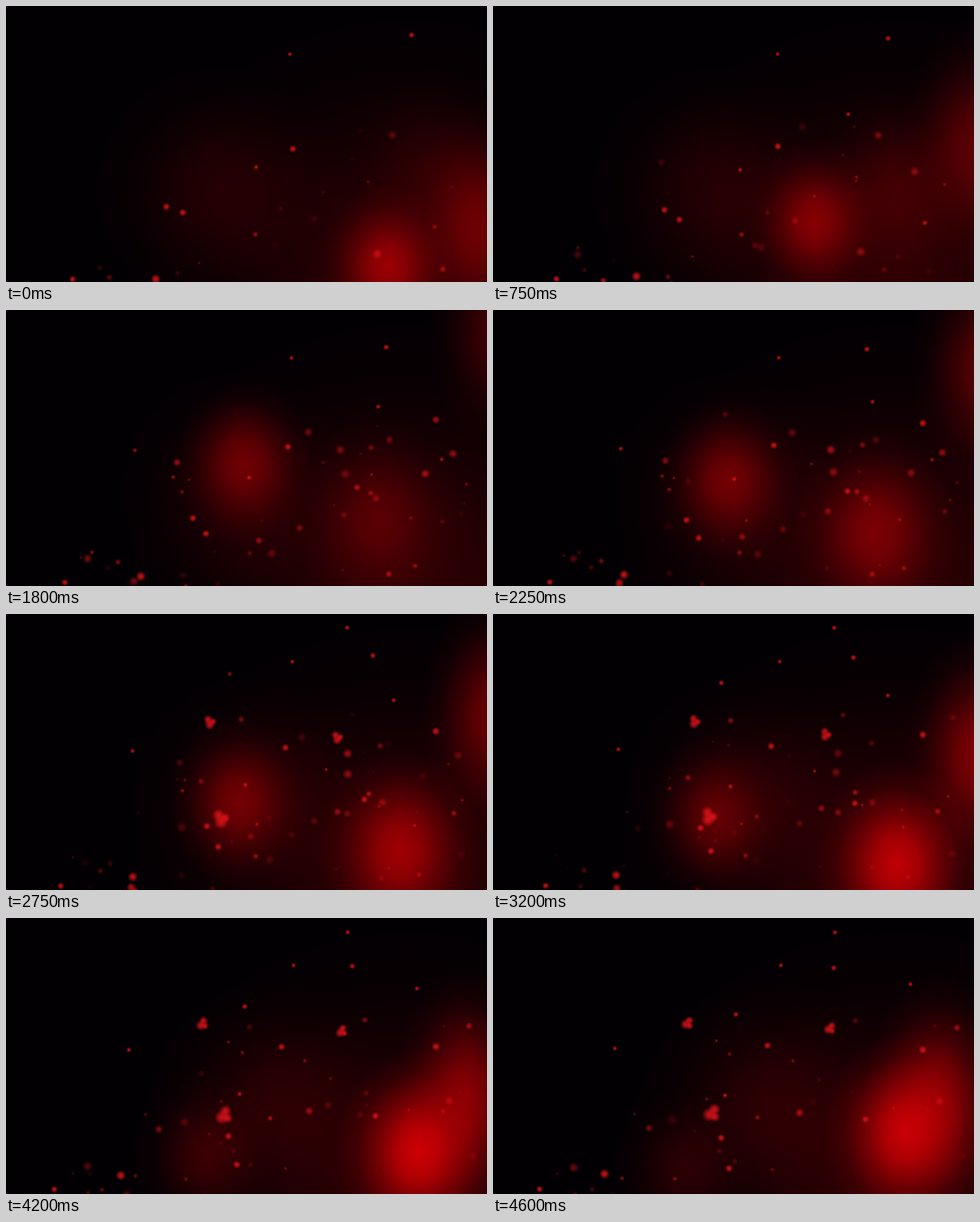
Recreate the animation shown at these times as an HTML page with a canvas. Size 498 by 286 pixels, loop 4650 ms.

```html
<!DOCTYPE html>
<html lang="en">
<head>
<meta charset="utf-8">
<title>Red embers</title>
<style>
  html, body { margin: 0; width: 100%; height: 100%; overflow: hidden; background: #030003; }
  canvas { display: block; }
</style>
</head>
<body>
<canvas id="stage" width="498" height="286"></canvas>
<script>
const ctx = document.getElementById('stage').getContext('2d');
const WIDTH = 498, HEIGHT = 286;
const LOOP = 4.65, STEP = 0.05;

// Smoke clouds drift between a few points: time, x, y, strength.
const clouds = [
  { r: 72, stretch: 1.2, path: [
    [0, 395, 270, .62], [1.8, 246, 158, .42], [2.75, 240, 195, .42], [LOOP, 195, 262, .15]] },
  { r: 86, stretch: 1.25, path: [
    [0, 440, 170, .1], [1.8, 385, 215, .28], [3.6, 428, 272, .98], [LOOP, 426, 220, .85]] },
  { r: 76, stretch: 1.7, path: [
    [0, 490, 230, .4], [1.8, 512, 20, .3], [3.6, 500, 180, .6], [LOOP, 460, 185, .5]] }
];

// Bright embers: x, y, end x, end y, radius, birth time.
const leaders = [
  [420, 30, 352, 52, 2.1, 0],
  [69, 283, 48, 281, 2.4, 0],
  [166, 208, 237, 228, 2.6, 0],
  [183, 214, 245, 260, 2.6, 0],
  [259, 167, 240, 184, 1.7, 0],
  [297, 148, 284, 132, 2.6, 0],
  [294, 50, 298, 49, 1.6, 0],
  [155, 283, 115, 265, 3.4, 0],
  [362, 116, 433, 68, 1.7, .4],
  [445, 112, 445, 137, 2.8, 1.6],
  [362, 182, 386, 209, 2.5, 1.6],
  [134, 146, 126, 135, 1.7, 1.6],
  [353, 14, 354, 15, 1.8, 2.5],
  [230, 59, 252, 101, 2, 2.6],
  [222, 213, 228, 202, 6, 2.4],
  [213, 112, 202, 109, 4.4, 2.4],
  [342, 130, 350, 114, 4.2, 2.4]
];

let seed = 23;
const random = () => (seed = seed * 16807 % 2147483647) / 2147483647;
const between = (a, b) => a + (b - a) * random();

// Small embers gather below a diagonal rising to the right.
const swarm = Array.from({ length: 85 }, () => {
  const x = between(70, 480);
  return {
    x, y: HEIGHT - Math.min(190, x - 50) * random(),
    vx: between(-9, 10), vy: between(-9, 6),
    r: 1.2 + 2.4 * random() ** 2,
    alpha: between(.2, .75),
    birth: between(-1.5, 3.6), life: between(2, 4)
  };
});

const mix = (a, b, k) => a + (b - a) * k;

function blob(x, y, r, stretch, color, stops) {
  const fill = ctx.createRadialGradient(0, 0, 0, 0, 0, r);
  stops.forEach(([at, alpha]) => fill.addColorStop(at, `rgba(${color},${alpha})`));
  ctx.save();
  ctx.translate(x, y);
  ctx.scale(1, stretch);
  ctx.fillStyle = fill;
  ctx.fillRect(-r, -r, 2 * r, 2 * r);
  ctx.restore();
}

const glow = (x, y, r, strength, stretch = 1) =>
  blob(x, y, r, stretch, '224,0,4',
    [[0, strength], [.25, strength * .8], [.5, strength * .42], [.75, strength * .12], [1, 0]]);

const ember = (x, y, r, alpha) =>
  blob(x, y, r * 1.6, 1, '232,20,26', [[0, alpha], [.35, alpha * .8], [1, 0]]);

// Larger embers are uneven clumps that turn slowly.
function clump(x, y, r, alpha, t) {
  for (let i = 0; i < 3; i++) {
    const angle = i * 2.3 + t * .6;
    ember(x + Math.cos(angle) * r * .7, y + Math.sin(angle) * r * .7, r * (.8 - i * .12), alpha);
  }
}

function drawCloud({ r, stretch, path }, t) {
  const next = path.findIndex(point => point[0] > t);
  const a = path[next - 1], b = path[next];
  const k = (t - a[0]) / (b[0] - a[0]);
  const [, x, y, strength] = a.map((v, i) => mix(v, b[i], k));
  glow(x, y, r, strength, stretch);
}

function draw(t) {
  ctx.fillStyle = '#030003';
  ctx.fillRect(0, 0, WIDTH, HEIGHT);
  glow(415, 270, 290, .2, .9);
  glow(220 + 14 * t, 190, 130, .13);
  clouds.forEach(cloud => drawCloud(cloud, t));

  for (const { x, y, vx, vy, r, alpha, birth, life } of swarm) {
    const age = t - birth;
    if (age < 0 || age > life) continue;
    ember(x + vx * age, y + vy * age, r, alpha * Math.sin(Math.PI * age / life));
  }

  for (const [x, y, endX, endY, r, birth] of leaders) {
    if (t < birth) continue;
    const k = (t - birth) / (LOOP - birth);
    const alpha = birth ? Math.min(1, (t - birth) * 4) * .85 : .85;
    (r > 4 ? clump : ember)(mix(x, endX, k), mix(y, endY, k), r, alpha, t);
  }
}

function tick(now) {
  const step = Math.floor(now / 1000 % LOOP / STEP);
  draw(step * STEP);
  requestAnimationFrame(tick);
}
draw(0);
requestAnimationFrame(tick);
</script>
</body>
</html>
```
